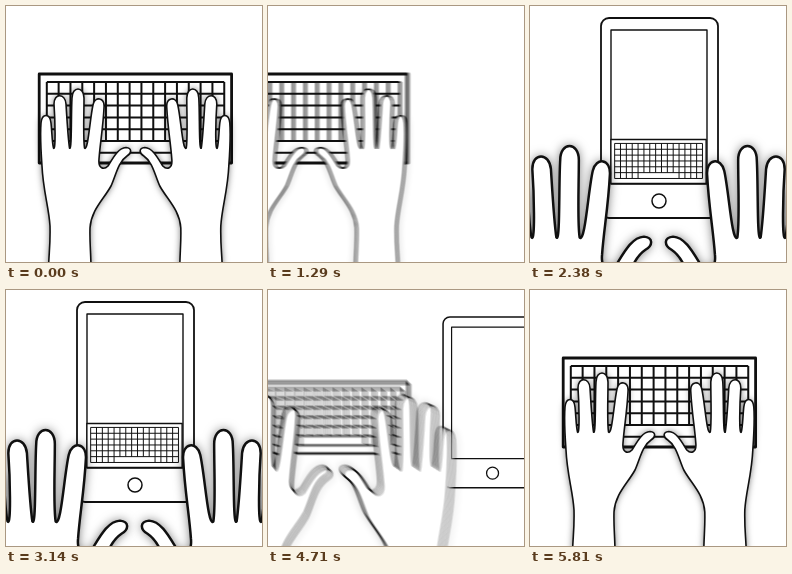
An HTML page with a canvas for the animation above (6.74 s loop, 256x256 px).

```html
<!DOCTYPE html>
<html lang="en">
<head>
<meta charset="utf-8">
<title>Typing hands</title>
<style>
html, body { margin: 0; width: 100%; height: 100%; overflow: hidden; background: #fff; }
canvas { display: block; width: 100vw; height: 100vh; }
</style>
</head>
<body>
<canvas id="stage" width="256" height="256"></canvas>
<script>
const SIZE = 256, LOOP = 6740, SHUTTER = 20, SAMPLES = 13;
const AXIS = 129.4, SLIDE = 102;
const INK = '#101010';
const view = document.getElementById('stage').getContext('2d');
const buffer = document.createElement('canvas');
buffer.width = buffer.height = SIZE;
const ctx = buffer.getContext('2d');

const ramp = (t, from, to) => Math.min(1, Math.max(0, (t - from) / (to - from)));
const mix = (a, b, p) => a + (b - a) * p;
const easeInOut = (u, power) =>
  u < 0.5 ? Math.pow(2 * u, power) / 2 : 1 - Math.pow(2 - 2 * u, power) / 2;

// Left hand outline; the right hand is its mirror about AXIS.
const hand = new Path2D(`
  M42.5 262 C43 246 44.5 238 44 220 C43 202 37 184 36 160 C35 146 34 130 35 117
  C36 107 44 107 45 117 C46 126 46 136 47.5 142
  C50 146 49 112 48 98 C48 87 59 87 60 98 C61 114 62 132 63.5 142
  C66 146 65 108 66 92 C66 80 78 80 78 92 C78 110 77 132 78.5 142
  C82 146 84 112 87 99 C89 90 99 91 98 102 C97 122 94 138 93 153
  C92 163 98 164 102 160 C107 152 112 142 120 141.5
  C126 142 126 147 121 150 C112 156 110 169 105 180
  C98 193 85 204 84 222 C83.5 236 85 248 85 262`);

function pose(t) {
  const zoom = ramp(t, 1700, 2320) - ramp(t, 4380, 4980);
  return {
    slide: easeInOut(ramp(t, 930, 1430) - ramp(t, 5290, 5720), 2),
    zoom: easeInOut(zoom, 2),
    travel: easeInOut(zoom, 3),
    fade: ramp(t, 1390, 1610) - ramp(t, 5070, 5330),
    shadow: t < 960 || t >= 5790 || (t >= 2380 && t < 4440) ? 0.6 : 0.2
  };
}

function placed(x, y, scale, draw) {
  ctx.save();
  ctx.translate(x, y);
  ctx.scale(scale, scale);
  draw();
  ctx.restore();
}

function box(x, y, w, h, radius, lineWidth) {
  ctx.lineWidth = lineWidth;
  ctx.beginPath();
  ctx.roundRect(x, y, w, h, radius);
  ctx.fill();
  ctx.stroke();
}

function drawTablet({ zoom, fade }) {
  if (fade <= 0) return;
  ctx.globalAlpha = fade;
  placed(mix(245, 71, zoom), mix(37, 12, zoom), mix(0.755, 1, zoom), () => {
    box(0, 0, 117, 200, 8, 1.8);
    box(10, 12, 96, 154, 0, 1.4);
    ctx.lineWidth = 1.5;
    ctx.beginPath();
    ctx.arc(58, 183, 7, 0, 7);
    ctx.stroke();
  });
  ctx.globalAlpha = 1;
}

function drawKeyboard({ slide, zoom, travel }) {
  const x = mix(AXIS - SLIDE * slide, 128.5, travel);
  const left = -88.6, top = -36.5, colWidth = 11.83, rowHeight = 11.8;
  placed(x, mix(112.5, 155.5, travel), mix(1, 0.495, zoom), () => {
    box(-96.2, -44.5, 192.4, 89, 0, 2.8);
    ctx.lineWidth = 2;
    ctx.beginPath();
    for (let row = 0; row <= 6; row++) {
      const y = top + row * rowHeight;
      ctx.moveTo(left, y);
      ctx.lineTo(left + 15 * colWidth, y);
    }
    for (let col = 0; col <= 15; col++) {
      const overSpaceBar = col > 4 && col < 11;
      const colX = left + col * colWidth;
      ctx.moveTo(colX, top);
      ctx.lineTo(colX, top + (overSpaceBar ? 5 : 6) * rowHeight);
    }
    ctx.stroke();
  });
}

function drawHands({ slide, zoom, shadow }) {
  const scale = mix(1, 1.55, zoom);
  const x = mix(AXIS - SLIDE * slide, 128.5, zoom);
  placed(x, mix(94, 157, zoom), scale, () => {
    for (const side of [1, -1]) {
      ctx.save();
      ctx.scale(side, 1);
      ctx.translate(-AXIS, -94);
      ctx.shadowColor = `rgba(0,0,0,${shadow})`;
      ctx.shadowBlur = 7 * scale;
      ctx.fill(hand);
      ctx.shadowColor = 'transparent';
      ctx.lineWidth = 1.6;
      ctx.stroke(hand);
      ctx.restore();
    }
  });
}

function drawScene(state, tabletState) {
  ctx.fillStyle = '#fff';
  ctx.strokeStyle = INK;
  ctx.lineJoin = 'round';
  ctx.fillRect(0, 0, SIZE, SIZE);
  drawTablet(tabletState);
  drawKeyboard(state);
  drawHands(state);
}

// Hands and keyboard are averaged over the shutter time; the tablet stays crisp.
function render(t) {
  const now = pose(t);
  const early = pose(t - SHUTTER / 2), late = pose(t + SHUTTER / 2);
  const moving = early.slide !== late.slide || early.zoom !== late.zoom;
  const count = moving ? SAMPLES : 1;
  for (let i = 0; i < count; i++) {
    const offset = moving ? (i / (count - 1) - 0.5) * SHUTTER : 0;
    drawScene({ ...pose(t + offset), shadow: now.shadow }, now);
    view.globalAlpha = 1 / (i + 1);
    view.drawImage(buffer, 0, 0);
  }
}

const start = performance.now();
function tick() {
  render((performance.now() - start) % LOOP);
  requestAnimationFrame(tick);
}
tick();
</script>
</body>
</html>
```
